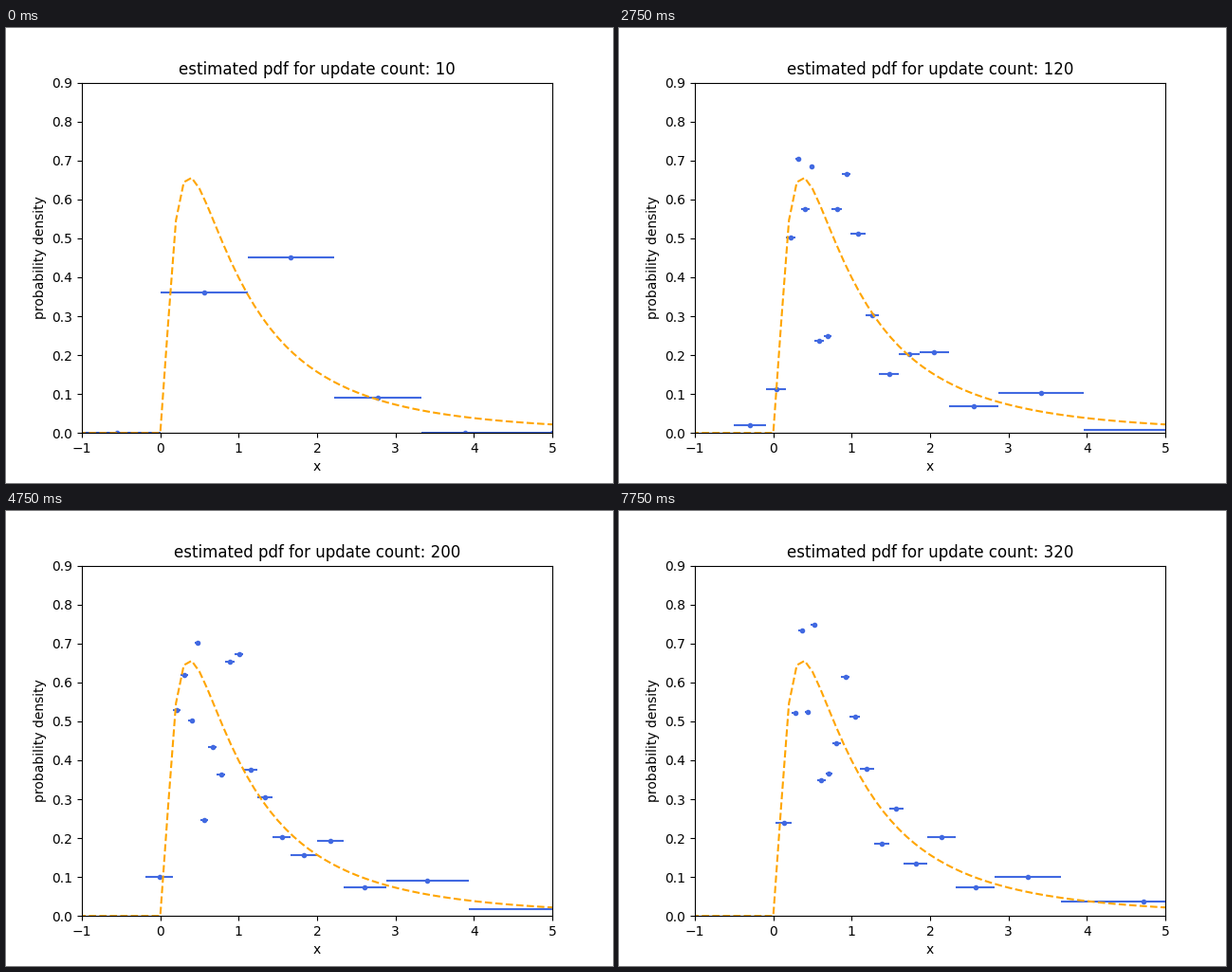
A matplotlib script for the animation above (8 s loop, 640 by 480 pixels).

```python
import math

import numpy as np
import matplotlib.pyplot as plt
from matplotlib.animation import FuncAnimation

FRAMES, INTERVAL = 32, 250
PER_FRAME = 10      # updates between two pictures
MIN_RATE = .007     # weight of one update once old ones are forgotten

rng = np.random.default_rng(4)
z = np.linspace(-3.5, 3.5, 701)
z_cdf = [.5 * (1 + math.erf(v / math.sqrt(2))) for v in z]


def quantile(p):
    """Inverse of the standard lognormal distribution."""
    return np.exp(np.interp(p, z_cdf, z))


def even_mass_edges(lead, low, high, count):
    """Edges that hold about equal mass, after a few given ones on the left."""
    p = np.linspace(low, high, count)
    p[1:-1] += rng.uniform(-.008, .008, count - 2)
    return np.append(lead, quantile(p))


def centres(edges):
    return (edges[:-1] + edges[1:]) / 2


def lognormal(x):
    y = np.zeros_like(x)
    pos = x > 1e-9
    y[pos] = np.exp(-np.log(x[pos]) ** 2 / 2) / (x[pos] * math.sqrt(2 * math.pi))
    return y


def simulate():
    """Histogram after each frame: it learns, forgets and is rebinned."""
    rebin = {
        2: even_mass_edges([-.5, -.09], .036, .966, 17),
        14: even_mass_edges([-.19], .036, .969, 18),
        24: even_mass_edges([.03], .074, .96, 18),
    }
    edges = (np.arange(11) - 5) * 10 / 9
    heights = np.histogram([.5] * 4 + [1.5] * 5 + [2.5], edges, density=True)[0]
    states = [(edges, heights)]
    for frame in range(1, FRAMES):
        if frame in rebin:
            old, edges = edges, rebin[frame]
            heights = np.interp(centres(edges), centres(old), heights, left=0)
        width = np.diff(edges)
        for i in range(PER_FRAME):
            rate = max(1 / (PER_FRAME * frame + i + 1), MIN_RATE)
            hit = np.histogram(rng.lognormal(), edges)[0]
            heights = heights * (1 - rate) + rate * hit / width
        states.append((edges, heights))
    return states


states = simulate()

fig, ax = plt.subplots(figsize=(6.4, 4.8), dpi=100)
dots, = ax.plot([], [], ".", color="royalblue")
bars = ax.hlines([0], [0], [1], color="royalblue", lw=1.5)
grid = np.linspace(-5, 5, 101)
ax.plot(grid, lognormal(grid), "--", color="orange")
ax.set_xlim(-1, 5)
ax.set_ylim(0, .9)
ax.set_xlabel("x")
ax.set_ylabel("probability density")
title = ax.set_title("")


def update(frame):
    edges, heights = states[frame]
    dots.set_data(centres(edges), heights)
    bars.set_segments([[(a, y), (b, y)]
                       for a, b, y in zip(edges[:-1], edges[1:], heights)])
    title.set_text(f"estimated pdf for update count: {PER_FRAME * (frame + 1)}")
    return dots, bars, title


anim = FuncAnimation(fig, update, frames=FRAMES, interval=INTERVAL,
                     repeat=True, repeat_delay=0)
plt.show()
```
